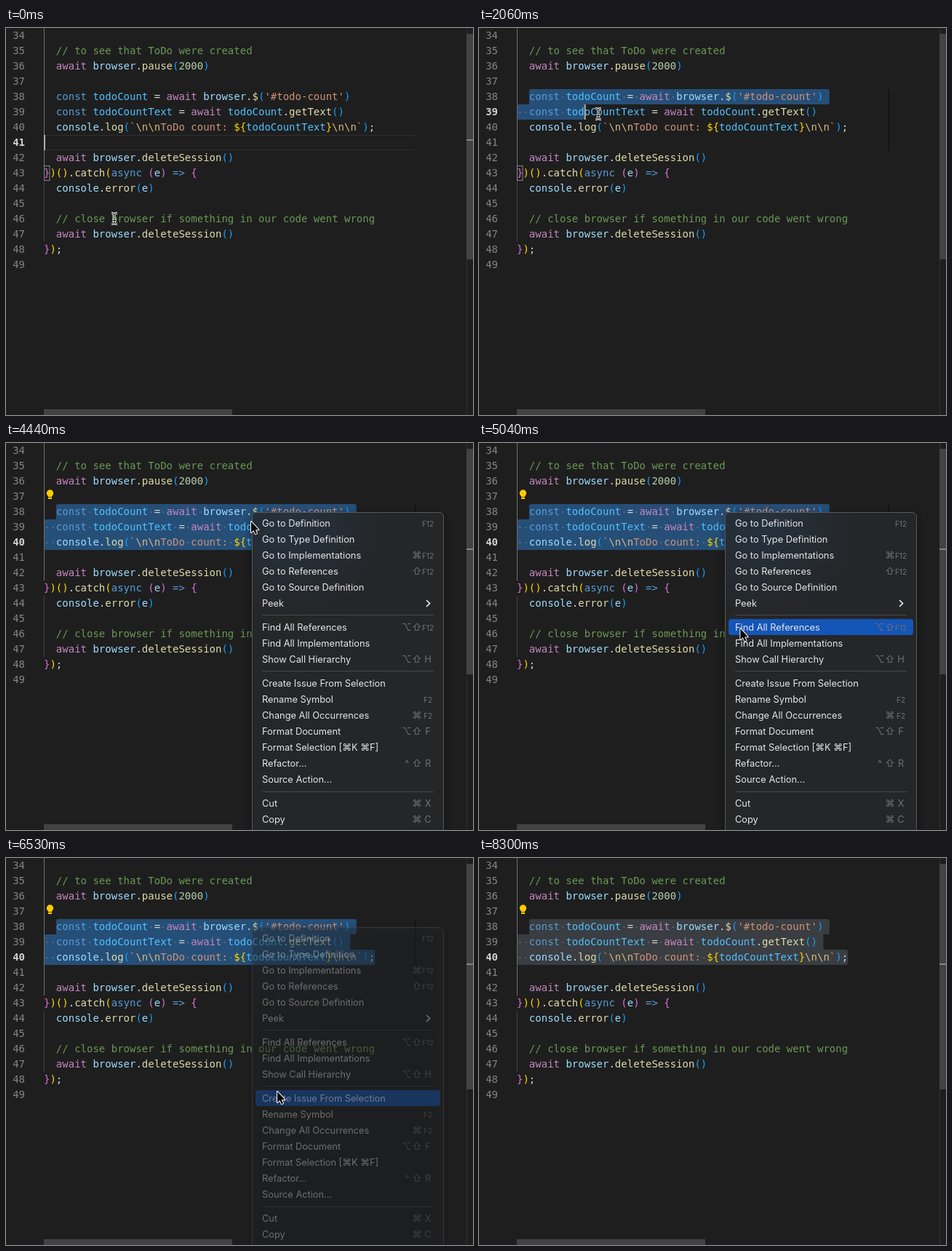
An HTML page with a canvas for the animation above (8400 ms loop, 642 by 532 pixels).

```html
<!DOCTYPE html>
<html lang="en">
<head>
<meta charset="utf-8">
<title>Code editor context menu</title>
<style>
html, body { margin: 0; width: 100%; height: 100%; overflow: hidden; background: #1e1e1e; }
canvas { display: block; }
</style>
</head>
<body>
<canvas id="stage" width="642" height="532"></canvas>
<script>
const g = document.getElementById('stage').getContext('2d');
const LOOP = 8400, TICK = 148;
const LEFT = 52, ROW = 21, FIRST = 34, CHAR = 8.428;
const MONO = '14px "DejaVu Sans Mono", monospace';
const UI = 'Inter, "DejaVu Sans", sans-serif';

const COLORS = {
  c: '#6a9955', a: '#c586c0', v: '#9cdcfe', k: '#569cd6', n: '#4fc1ff', f: '#dcdcaa', s: '#ce9178',
  e: '#d7ba7d', u: '#b5cea8', d: '#d4d4d4', y: '#ffd700', o: '#da70d6', b: '#179fff'
};

// Each piece is a colour key followed by its text.
const CLOSE = 'd  |aawait |vbrowser|d.|fdeleteSession|b()';
const lines = [
  '',
  'd  |c// to see that ToDo were created',
  'd  |aawait |vbrowser|d.|fpause|b(|u2000|b)',
  '',
  "d  |kconst |ntodoCount|d = |aawait |vbrowser|d.|f$|b(|s'#todo-count'|b)",
  'd  |kconst |ntodoCountText|d = |aawait |ntodoCount|d.|fgetText|b()',
  'd  |vconsole|d.|flog|b(|s`|e\\n\\n|sToDo count: |y${|ntodoCountText|y}|e\\n\\n|s`|b)|d;',
  '',
  CLOSE,
  'o}|y)()|d.|fcatch|y(|kasync|d |o(|ve|o)|d |k=>|d |o{',
  'd  |vconsole|d.|ferror|b(|ve|b)',
  '',
  'd  |c// close browser if something in our code went wrong',
  CLOSE,
  'o}|y)|d;',
  ''
].map(line => line.split('|').filter(Boolean).map(p => ({ color: COLORS[p[0]], text: p.slice(1) })));
const plain = lines.map(line => line.map(p => p.text).join(''));

// Menu rows: centre y, label, modifier keys, key
const menu = [
  [110, 'Go to Definition', '', 'F12'], [132, 'Go to Type Definition'],
  [154, 'Go to Implementations', '⌘', 'F12'], [176, 'Go to References', '⇧', 'F12'],
  [198, 'Go to Source Definition'], [220, 'Peek'],
  [253, 'Find All References', '⌥⇧', 'F12'], [275, 'Find All Implementations'],
  [297, 'Show Call Hierarchy', '⌥⇧', 'H'],
  [330, 'Create Issue From Selection'], [352, 'Rename Symbol', '', 'F2'],
  [374, 'Change All Occurrences', '⌘', 'F2'], [396, 'Format Document', '⌥⇧', 'F'],
  [418, 'Format Selection [⌘K ⌘F]'], [440, 'Refactor...', '^⇧', 'R'],
  [462, 'Source Action...'], [495, 'Cut', '⌘', 'X'], [517, 'Copy', '⌘', 'C']
];

// Pointer path: tick, x, y
const path = [
  [2, 149, 262], [10, 69, 101], [11, 82, 102], [14, 164, 118], [18, 490, 149], [19, 500, 148],
  [20, 530, 142], [22, 530, 142], [23, 330, 120], [24, 77, 106], [25, 220, 100], [26, 337, 99],
  [28, 337, 99], [29, 337, 103], [30, 337, 108], [35, 365, 292], [36, 366, 297], [39, 373, 321],
  [48, 373, 321], [51, 521, 429], [54, 630, 515], [55, 700, 570]
];

function pointerAt(n) {
  const i = path.findIndex(p => p[0] >= n);
  if (i < 0) return { x: 700, y: 570 };
  const b = path[i], a = path[Math.max(0, i - 1)];
  const k = b === a ? 0 : (n - a[0]) / (b[0] - a[0]);
  return { x: a[1] + (b[1] - a[1]) * k, y: a[2] + (b[2] - a[2]) * k };
}

function rect(x, y, w, h, color) {
  g.fillStyle = color;
  g.fillRect(x, y, w, h);
}

function round(x, y, w, h, r, color) {
  g.beginPath();
  g.roundRect(x, y, w, h, r);
  g.fillStyle = color;
  g.fill();
}

function text(str, x, y, color, font, align = 'left') {
  g.font = font;
  g.textAlign = align;
  g.fillStyle = color;
  g.fillText(str, x, y);
}

// The caret follows the pointer while dragging, then rests at the end of row 6.
function caretAt(n) {
  if (n < 11) return { row: 7, col: 0 };
  const p = pointerAt(Math.min(n, 20));
  const row = Math.floor(p.y / ROW);
  const col = Math.max(2, Math.round((p.x - LEFT) / CHAR - 2));
  return { row, col: Math.min(col, plain[row].length) };
}

function drawSelection(caret, color) {
  const spans = [];
  for (let row = 4; row <= caret.row; row++) {
    const from = row === 4 ? 2 : 0;
    const to = row === caret.row ? caret.col : plain[row].length + 1;
    if (to > from) spans.push({ row, from, to });
  }
  spans.forEach(({ row, from, to }, i) => {
    const prev = spans[i - 1], next = spans[i + 1];
    const corners = [i < 2, !prev || to > prev.to, !next || to > next.to, !next].map(c => c ? 3 : 0);
    round(LEFT + from * CHAR, row * ROW, (to - from) * CHAR, ROW, corners, color);
    for (let c = from; c < to; c++) {
      if (plain[row][c] === ' ') rect(LEFT + c * CHAR + 3.2, row * ROW + 10, 2, 2, 'rgba(227,228,226,.22)');
    }
  });
}

function drawBulb() {
  g.beginPath();
  g.arc(60.5, 69, 4.7, 0, 7);
  g.fillStyle = '#fc0';
  g.fill();
  rect(58, 72, 5, 5, '#fc0');
  rect(58, 74, 5, 1, '#6b5600');
}

function drawEditor(n) {
  const caret = caretAt(n), selecting = n >= 11;
  rect(0, 0, 642, 532, '#1e1e1e');
  if (selecting) {
    drawSelection(caret, n < 56 ? '#264f78' : '#3a3d41');
    if (n < 56) rect(562, 84, 2, n < 45 ? 84 : 448, '#131313');
  } else {
    rect(LEFT, 147, 510, 1, '#303030');
    rect(LEFT, 167, 510, 1, '#303030');
  }
  rect(LEFT, 0, 1, 189, '#707070');
  rect(LEFT, 210, 1, 84, '#404040');
  if (n < 18) {
    g.strokeStyle = '#888';
    g.lineWidth = 1;
    g.strokeRect(52.5, 189.5, 7.5, 20);
  }

  lines.forEach((line, row) => {
    const y = row * ROW + 15, active = row === caret.row;
    text(FIRST + row, 26, y, active ? '#d0d0d0' : '#858585', (active ? 'bold ' : '') + MONO, 'right');
    let col = 0;
    for (const p of line) {
      text(p.text, LEFT + col * CHAR, y, p.color, MONO);
      col += p.text.length;
    }
  });

  const caretOn = n < 1 || (n > 3 && n < 8) || (n > 10 && n < 23);
  if (caretOn) rect(LEFT + caret.col * CHAR, caret.row * ROW, 2, ROW, '#aeafad');
  if (n >= 18) drawBulb();

  rect(633, 0, 1, 532, '#303031');
  rect(633, 8, 9, 310, '#434343');
  if (n < 11 || n >= 18) rect(633, 145 + (caret.row - 6) * 8, 9, 2, '#858585');
  rect(LEFT, 524, 259, 8, '#424242');
}

function drawMenu(pointer) {
  g.save();
  g.shadowColor = 'rgba(0,0,0,.4)';
  g.shadowBlur = 14;
  g.shadowOffsetY = 4;
  round(338, 95, 264, 460, 6, '#252628');
  g.restore();
  const tint = g.createRadialGradient(390, 110, 5, 390, 110, 130);
  tint.addColorStop(0, 'rgba(38,79,120,.28)');
  tint.addColorStop(1, 'rgba(38,79,120,0)');
  round(338, 95, 264, 460, 6, tint);
  g.beginPath();
  g.roundRect(338.5, 95.5, 263, 460, 6);
  g.strokeStyle = '#58595b';
  g.lineWidth = 1;
  g.stroke();

  for (const y of [236, 313, 479]) rect(352, y, 236, 1, '#48494b');
  for (const [y, label, mods = '', key = ''] of menu) {
    if (pointer.x >= 343 && Math.abs(pointer.y - y) <= 11) round(343, y - 11, 254, 22, 4, '#1455b8');
    text(label, 352, y + 4.7, '#e6e6e6', '12.8px ' + UI);
    const gray = '#717274';
    [...mods].reverse().forEach((m, i) => text(m, 565 - i * 14, y + 5, gray, '13px ' + UI, 'center'));
    text(key, 580, y + 4.7, gray, (key.length > 1 ? '10px ' : '12.8px ') + UI, 'center');
  }
  g.beginPath();
  g.moveTo(578, 216);
  g.lineTo(582.5, 220.5);
  g.lineTo(578, 225);
  g.strokeStyle = '#e6e6e6';
  g.lineWidth = 1.7;
  g.stroke();
}

const ARROW = new Path2D('M0 0V15L3.4 12L5.8 17.2L8 16.2L5.8 11.2H10.4Z');
const BEAM = new Path2D('M-4 -7.5Q0 -7.5 0 -5Q0 -7.5 4 -7.5M0 -5V5M-4 7.5Q0 7.5 0 5Q0 7.5 4 7.5M-2.5 2.5H2.5');

function drawPointer({ x, y }, arrow) {
  const shape = arrow ? ARROW : BEAM;
  g.save();
  g.translate(x, y);
  g.lineJoin = 'round';
  g.strokeStyle = '#fff';
  g.lineWidth = arrow ? 2 : 3;
  g.stroke(shape);
  if (arrow) {
    g.fillStyle = '#000';
    g.fill(shape);
  } else {
    g.strokeStyle = '#000';
    g.lineWidth = 1;
    g.stroke(shape);
  }
  g.restore();
}

function draw() {
  const n = Math.floor(performance.now() % LOOP / TICK + 0.12);
  const pointer = pointerAt(n), open = n >= 26 && n < 45;
  drawEditor(n);
  if (open) {
    g.globalAlpha = n === 44 ? 0.4 : 1;
    drawMenu(pointer);
    g.globalAlpha = 1;
  }
  drawPointer(pointer, open);
  requestAnimationFrame(draw);
}
draw();
</script>
</body>
</html>
```
